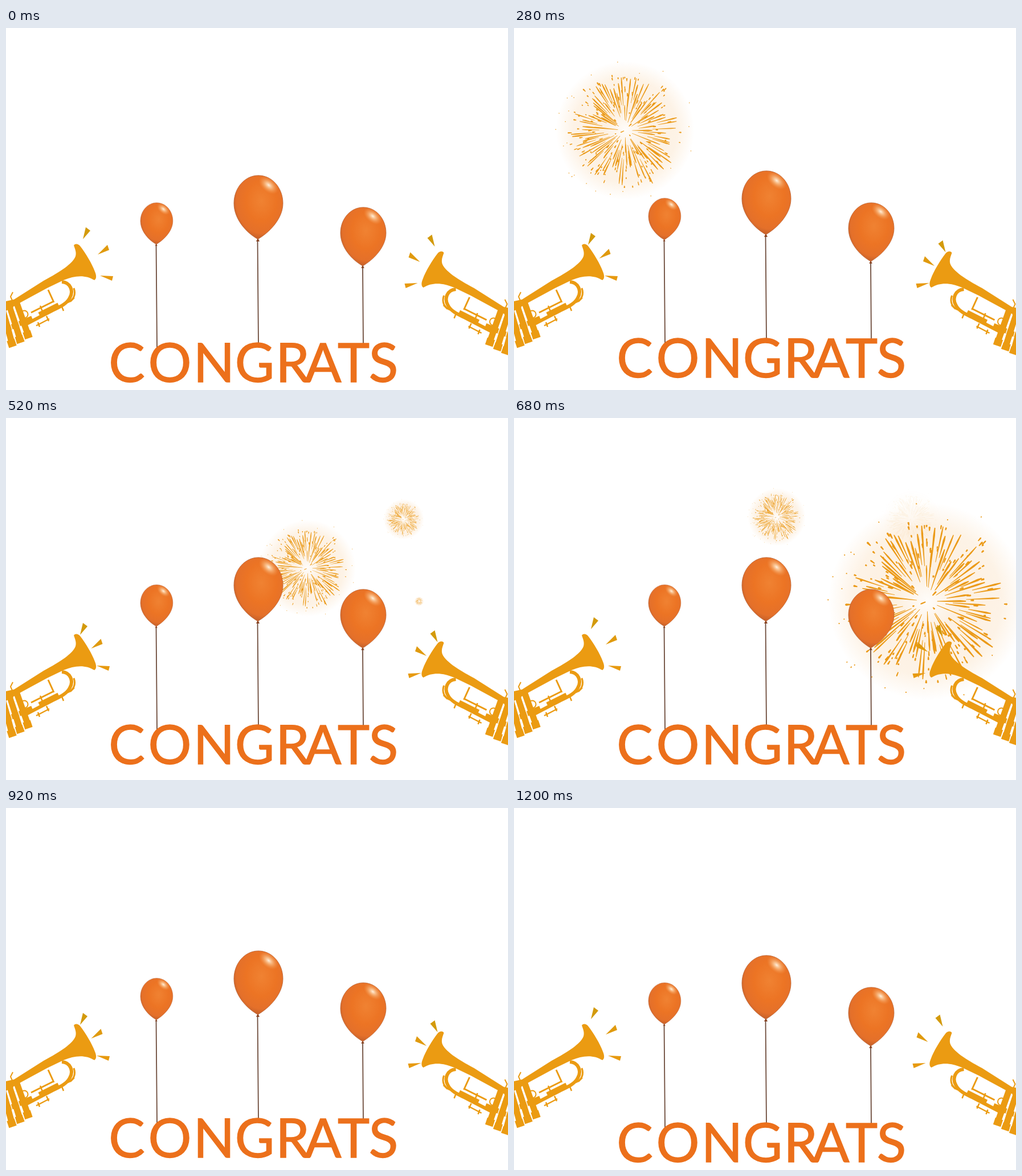
These frames come from a looping animation (881x636 px, 1.24 s). An HTML page:

```html
<!DOCTYPE html>
<html lang="en">
<head>
<meta charset="utf-8">
<title>Congrats</title>
<style>
  html, body { margin: 0; height: 100%; overflow: hidden; background: #fff; }
  svg { display: block; }
  .line { fill: none; stroke: #eb9b12; }
  text { font: 95px Lato, "Open Sans", sans-serif; text-anchor: middle; fill: #ec701b; stroke: #ec701b; stroke-width: 1.4; }
</style>
</head>
<body>
<svg width="881" height="636" viewBox="0 0 881 636">
  <defs>
    <radialGradient id="halo">
      <stop offset="0" stop-color="#f0a040" stop-opacity=".03"/>
      <stop offset=".3" stop-color="#f0a040" stop-opacity=".16"/>
      <stop offset=".75" stop-color="#f0a040" stop-opacity=".13"/>
      <stop offset="1" stop-color="#f0a040" stop-opacity="0"/>
    </radialGradient>
    <radialGradient id="skin" cx=".56" cy=".4" r=".62">
      <stop offset="0" stop-color="#f08232"/>
      <stop offset=".5" stop-color="#ec7424"/>
      <stop offset=".82" stop-color="#e4702a"/>
      <stop offset="1" stop-color="#bd5c2a"/>
    </radialGradient>
    <radialGradient id="shine">
      <stop offset="0" stop-color="#fff0dc"/>
      <stop offset=".35" stop-color="#fac592" stop-opacity=".8"/>
      <stop offset="1" stop-color="#f39a50" stop-opacity="0"/>
    </radialGradient>

    <g id="burst">
      <circle r="118" fill="url(#halo)"/>
      <path id="sparks" fill="#eb9a18"/>
    </g>

    <g id="balloon">
      <path d="M42 110L39 116L45 116Z" fill="#8a4523"/>
      <path d="M43 0C67 0 86 22 86 49C86 77 61 101 42 112C22 101 0 77 0 49C0 22 19 0 43 0Z"
            fill="url(#skin)" stroke="#b85f30" stroke-width=".8"/>
      <ellipse cx="61" cy="17" rx="20" ry="12" transform="rotate(40 61 17)" fill="url(#shine)"/>
    </g>

    <g id="trumpet">
      <path fill="#eb9b12" d="M119 382C121 378 127 379 130 383C140 396 151 414 156 428C159 435 159 441 155 443
        C139 433 120 435 101 443L72 457L26 482L0 497V480L14 477L66 444C96 428 117 414 122 401C124 394 121 388 119 382Z"/>
      <g class="line">
        <path stroke-width="11" d="M17 478L39 540M5 484L25 548M-7 490L11 556"/>
        <path stroke-width="14" d="M36 533L40 545M22 541L26 553M8 548L12 560"/>
        <path stroke-width="9" d="M-4 531L46 510"/>
        <path stroke-width="6" d="M98 446C113 447 119 462 112 474C106 486 92 491 80 497L28 524"/>
        <path stroke-width="7" d="M58 503L92 486"/>
        <path stroke-width="3" d="M44 500L82 481M74 460L84 482M119 457C123 468 119 478 108 482"/>
        <path stroke-width="2.5" d="M53 523L76 511M56 517L59 525M71 506L75 515M97 487L101 497M60 488L64 498"/>
        <path stroke-width="2" d="M12 464L8 472L12 481M120 474L113 481"/>
        <circle cx="32" cy="503" r="6.5" stroke-width="2"/>
      </g>
      <path stroke="#fff" stroke-width="1.3" d="M13 491L31 544M1 497L17 550"/>
      <path class="ray" fill="#d39a0c" d="M140 350L148 356L135 371Z"/>
      <path class="ray" fill="#e09a0e" d="M161 398L178 381L181 390Z"/>
      <path class="ray" fill="#e79a10" d="M165 435L188 436L186 444Z"/>
    </g>
  </defs>

  <g id="sky"></g>
  <use href="#trumpet"/>
  <use href="#trumpet" transform="translate(887.5 13) scale(-1 1)"/>
  <g id="banner">
    <path fill="none" stroke="#6e4c3c" stroke-width="1.8" d="M263.5 380L265 562M441.5 372L443 556M626 418L627 558"/>
    <use href="#balloon" transform="translate(236 307) scale(.66 .652)"/>
    <use href="#balloon" transform="translate(400 259)"/>
    <use href="#balloon" transform="translate(587 315) scale(.93 .92)"/>
    <text x="212 287.5 365 436.5 503 556.5 610 662.5" y="622">CONGRATS</text>
  </g>
</svg>
<script>
const STEP = 40, FRAMES = 31;
const $ = id => document.getElementById(id);

let seed = 11;
const rnd = (lo = 0, hi = 1) => {
  seed = (seed * 16807) % 2147483647;
  return lo + (hi - lo) * seed / 2147483647;
};

// A streak that widens outwards from radius r0 to r1.
function streak(angle, r0, r1, inner, outer) {
  const c = Math.cos(angle), s = Math.sin(angle);
  const point = (r, w) => `${(r * c - w * s).toFixed(1)} ${(r * s + w * c).toFixed(1)}`;
  const mid = r0 + (r1 - r0) * .8;
  return `M${point(r0, inner)}L${point(mid, outer)}L${point(r1, outer / 2)}L${point(r1, -outer / 2)}L${point(mid, -outer)}L${point(r0, -inner)}Z`;
}

function makeSparks() {
  let d = '';
  for (let i = 0; i < 96; i++) {
    const start = rnd(12, 58);
    d += streak((i + rnd(-.4, .4)) / 96 * 2 * Math.PI, start, Math.min(start + rnd(25, 55), rnd(84, 102)), .3, rnd(.8, 1.3));
  }
  for (let i = 0; i < 170; i++) {
    const r = 95 * Math.sqrt(rnd(0, 1));
    d += streak(rnd(0, 6.283), r, r + rnd(2, 7), .6, rnd(.8, 1.3));
  }
  for (let i = 0; i < 26; i++) {
    const r = rnd(98, 122);
    d += streak(rnd(0, 6.283), r, r + 1.4, .5, .7);
  }
  return d;
}
$('sparks').setAttribute('d', makeSparks());

// keys: [frame, radius, opacity]
const bursts = [
  { x: 195, y: 180, keys: [[0, 0, 1], [7, 103, 1], [9, 134, 1], [13, 193, 0]] },
  { x: 529, y: 264, keys: [[7, 0, 1], [11, 60, 1], [13, 72, 1], [17, 94, 0]] },
  { x: 698, y: 178, keys: [[9, 0, 1], [11, 14, 1], [13, 30, 1], [17, 45, .1], [18, 50, 0]] },
  { x: 725, y: 322, keys: [[12.8, 0, 1], [13, 7, 1], [17, 147, 1], [20, 225, 0]] },
  { x: 461, y: 174, keys: [[14, 0, 1], [17, 43, 1], [19, 62, 1], [22, 82, 0]] }
];
for (const b of bursts) {
  b.node = document.createElementNS('http://www.w3.org/2000/svg', 'use');
  b.node.setAttribute('href', '#burst');
  $('sky').append(b.node);
}

function drawBurst({ x, y, keys, node }, k) {
  const i = keys.findIndex(key => key[0] > k);
  node.style.display = i > 0 ? '' : 'none';
  if (i < 1) return;
  const [from, to] = [keys[i - 1], keys[i]];
  const u = (k - from[0]) / (to[0] - from[0]);
  const mix = n => from[n] + (to[n] - from[n]) * u;
  node.setAttribute('transform', `translate(${x} ${y}) scale(${mix(1) / 100})`);
  node.setAttribute('opacity', mix(2));
}

const rays = [...document.querySelectorAll('.ray')];
const rayShift = ['-5 10', '-11.5 7', '-6 0'];

function draw(now) {
  const k = Math.floor(now / STEP) % FRAMES;
  const lift = Math.round(15 * Math.min(1, k / 14, (30 - k) / 14));
  $('banner').setAttribute('transform', `translate(0 ${-lift})`);
  const near = k % 9 >= 4 && k % 9 < 8;
  rays.forEach((ray, i) => ray.setAttribute('transform', `translate(${near ? rayShift[i] : '0 0'})`));
  bursts.forEach(b => drawBurst(b, k));
}

let begin;
function tick(now) {
  begin ??= now;
  draw(now - begin);
  requestAnimationFrame(tick);
}
draw(0);
requestAnimationFrame(tick);
</script>
</body>
</html>
```
